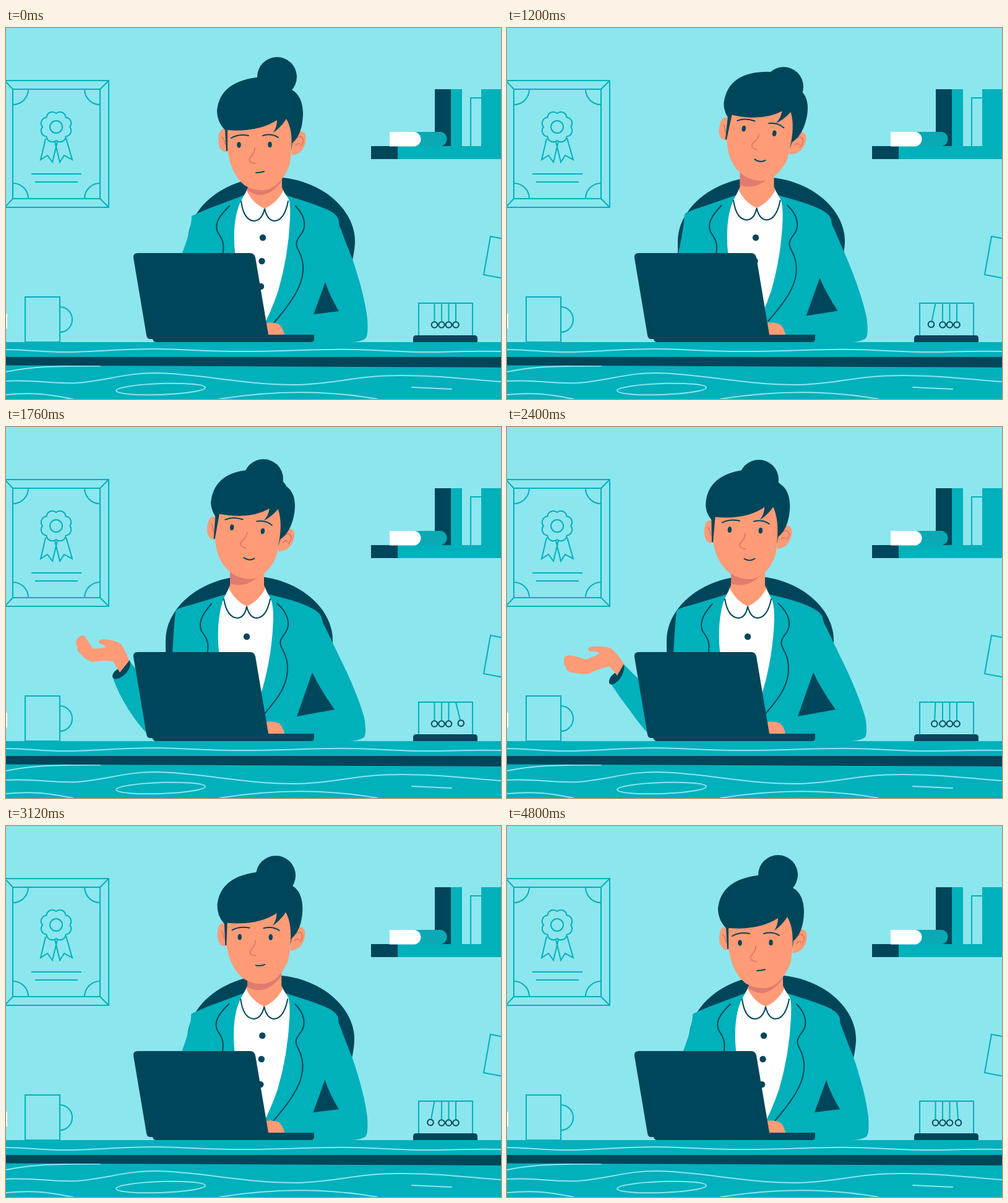
Write an HTML page that moves like this. It is 800 px wide and 600 px high and loops after 4.88 s.

```html
<!DOCTYPE html>
<html lang="en">
<head>
<meta charset="utf-8">
<title>Office call</title>
<style>
  html, body { margin: 0; width: 100%; height: 100%; overflow: hidden; background: #8ce6ee; }
  svg { display: block; width: 100vw; height: 100vh; }
  .teal { fill: #00b0bb; }
  .dark { fill: #00465a; }
  .skin { fill: #ff9b76; }
  .white { fill: #fff; }
  .line { fill: none; stroke: #00b0bb; stroke-width: 2; }
  .ink { fill: none; stroke: #00465a; stroke-width: 2; stroke-linecap: round; }
  .grain { fill: none; stroke: #8ce6ee; stroke-width: 2; stroke-linecap: round; }
  .crease { fill: none; stroke: #dc7869; stroke-width: 1.8; stroke-linecap: round; }
</style>
</head>
<body>
<svg viewBox="0 0 800 600">
  <!-- wall -->
  <g class="line">
    <path d="M-2 85H166V290H-2ZM11 99H152V276H11ZM-2 85L11 99M166 85L152 99M-2 290L11 276M166 290L152 276"/>
    <path d="M36 99A25 25 0 0 1 11 124M127 99A25 25 0 0 0 152 124M11 251A25 25 0 0 1 36 276M152 251A25 25 0 0 0 127 276"/>
    <path id="rosette"/>
    <circle cx="81" cy="160" r="10"/>
    <path d="M64 179L56 213L67 206L75 217L83 184M79 184L87 217L94 206L107 213L97 178"/>
    <path d="M41 236H122M47 249H116"/>
    <path d="M31 435H87V508H31ZM87 451A20 20.5 0 0 1 87 492"/>
    <path d="M810 342L783 337L772 399L810 406"/>
    <path d="M751 191V113H769"/>
  </g>
  <path class="white" d="M0 462H2V486H0Z"/>
  <path class="teal" d="M590 191H800V212H590ZM719 99H737V191H719ZM768 99H800V191H768Z"/>
  <path class="dark" d="M590 191H633V212H590ZM693 99H719V191H693Z"/>
  <path fill="#0aa9b4" d="M655 168H704A12 12 0 0 1 704 191H655Z"/>
  <path class="white" d="M620 168H661A12 12 0 0 1 661 191.500H620Z"/>

  <!-- cradle -->
  <path class="line" d="M667 498V445H754V498"/>
  <g id="cradle"></g>
  <path class="dark" d="M658 508V502Q658 497 663 497H757Q762 497 762 502V508Z"/>

  <!-- woman -->
  <path id="chair" class="dark" d="M294 380V345C294 291 353 241 429 241S564 291 564 345Q564 358 558 385Z"/>
  <path id="jacket" class="teal"/>
  <path id="gap" class="dark"/>
  <g id="neck">
    <path class="skin" d="M391 220V258L388 264Q398 285 418 294Q438 285 449 264L446 258V220Z"/>
    <path id="shade" fill="#e07b6f"/>
  </g>
  <path id="shirt" class="white"/>
  <path id="collar" class="ink"/>
  <path id="lapelL" class="ink"/>
  <path id="lapelR" class="ink"/>
  <g id="buttons" class="dark">
    <circle cx="415" cy="339" r="5.200"/><circle cx="413.500" cy="377" r="5.200"/><circle cx="412" cy="418" r="5.200"/>
  </g>
  <circle id="bun" class="dark" r="32"/>
  <g id="head">
    <path class="skin" d="M358 164Q346 161 344 172Q341 190 348 197Q352 202 360 199ZM460 170Q470 164 480 168Q487 172 484 185Q480 203 462 206Z"/>
    <path class="crease" d="M469 178Q477 172 480 180Q481 186 477 191M468 190Q471 185 475 188M349 176Q353 179 354 188"/>
    <path id="face" class="skin"/>
    <path id="hair" class="dark"/>
  </g>
  <g id="features">
    <path class="crease" d="M402 194Q402 202 396 208Q389 218 403 219"/>
    <path class="ink" d="M364 178Q376 171 392 174M415 174Q429 170 440 177"/>
    <path id="mouth" class="ink"/>
    <ellipse id="eyeL" class="dark" cx="376.500" cy="189" rx="3.200"/>
    <ellipse id="eyeR" class="dark" cx="426.500" cy="188.500" rx="3.200"/>
  </g>
  <g id="arm">
    <path id="sleeve" class="teal"/>
    <path id="cuff" class="dark"/>
    <path id="palm" class="skin"/>
  </g>
  <path id="typing" class="skin" d="M415 500V478Q430 474 441 479Q448 484 451 500Z"/>
  <path class="dark" d="M213 364H395Q401 364 403 371L424 496H498V503Q498 508 492 508H243Q238 508 237 503H233Q228 503 227 497L206 372Q205 364 213 364Z"/>

  <!-- desk -->
  <path class="teal" d="M0 508H800V600H0Z"/>
  <g class="grain">
    <path d="M0 520C40 520 60 525 105 524S190 519 240 519S320 524 400 523S500 519 560 520S640 525 700 524S770 522 800 523"/>
    <path d="M0 556C40 548 80 546 152 546.500"/>
    <path d="M0 571C45 568 70 576 115 574C165 570 195 557 245 558C320 560 380 577 470 577C540 575 560 562 640 562C710 562 750 569 800 572"/>
    <path d="M0 593C50 588 75 594 108 600M345 600C420 588 510 584 600 600"/>
    <ellipse cx="250" cy="584" rx="72" ry="9" transform="rotate(-2 250 584)"/>
    <path d="M656 581L720 584"/>
  </g>
  <path class="dark" d="M0 532H800V549L0 545.500Z"/>
</svg>
<script>
const LOOP = 4880, STEP = 80;
const $ = id => document.getElementById(id);
const set = (id, name, value) => $(id).setAttribute(name, value);
const lerp = (a, b, p) => a + (b - a) * p;
const ramp = (t, from, to) => {
  const u = Math.min(1, Math.max(0, (t - from) / (to - from)));
  return (1 - Math.cos(Math.PI * u)) / 2;
};
const hump = (t, from, to) => t > from && t < to ? Math.sin(Math.PI * (t - from) / (to - from)) : 0;

// Blend two paths that share the same commands.
function morph(id, [a, b], p) {
  const goal = b.match(/[\d.]+/g);
  let i = 0;
  set(id, 'd', a.replace(/[\d.]+/g, n => lerp(+n, +goal[i++], p).toFixed(2)));
}

const leaning = {
  jacket: [
    'M284 366Q300 325 300 304Q302 303 325 293L386 270L418 300L454 271Q500 285 520 294Q537 302 538 313Q538 320 541 325Q550 350 560 374Q579 430 584 470Q586 500 580 503Q572 508 555 508L270 508Z',
    'M269 366Q271 325 274 298Q276 293 298 288L354 271L389 300L425 271Q470 281 490 291Q509 300 510 309Q512 318 515 322Q526 345 538 370Q567 428 579 470Q584 500 577 503Q568 508 552 508L255 508Z'],
  gap: ['M516 411Q523 433 538 458L497 463Z', 'M495 397Q510 428 531 457L470 468Z'],
  shirt: [
    'M389 263L380 279Q367 305 369 350L380 490L412 490Q428 460 440 425Q456 370 459 310Q460 285 457 277L448 263Q438 283 418 292Q398 283 389 263Z',
    'M360 261L352 277Q341 305 343 350L354 490L386 490Q402 460 414 425Q430 370 432 310Q432 285 427 277L419 261Q409 281 389 290Q370 281 360 261Z'],
  collar: [
    'M380 280Q384 311 401 312Q414 311 418 292Q422 311 434 312Q450 311 456 280',
    'M352 278Q357 308 374 309Q386 308 389 290Q393 308 405 309Q421 308 427 278'],
  lapelL: [
    'M361 288C342 306 337 318 342 330C350 342 354 350 350 368',
    'M332 286C315 305 311 318 316 330C325 342 329 350 325 368'],
  lapelR: [
    'M468 288C483 303 486 320 478 332C468 345 467 349 473 360C484 381 483 405 466 433Q454 453 431 479',
    'M438 285C457 302 460 320 452 332C442 345 441 349 447 360C459 381 458 408 441 434Q430 450 414 468']
};
const looking = {
  shade: ['M391 240L391 263Q419 283 446 247L446 235Z', 'M391 225L391 255Q418 265 446 236L446 225Z'],
  face: [
    'M356 150L357 190Q362 235 385 254Q400 264 420 262Q445 256 458 222Q462 205 463 145Z',
    'M356 130L357 190Q362 231 388 248Q403 258 424 256Q448 250 459 218Q463 203 463 130Z'],
  hair: [
    'M356 199L354 165Q341 152 341 133Q346 85 412 79Q445 78 462 100Q480 110 480 140Q479 172 463 186L461 198Q464 165 453 147Q444 161 432 169Q438 160 438 149Q407 169 358 165L358 199Z',
    'M356 199L354 163Q342 149 344 133Q348 87 412 79Q445 78 462 100Q480 110 480 140Q479 172 463 186L461 198Q464 160 453 138Q444 152 432 160Q439 151 439 139Q410 161 360 158L358 199Z'],
  mouth: ['M404 234Q411 234 417 232', 'M402 235Q411 240 419 234']
};
const lowering = {
  sleeve: [
    'M199 378L172 404Q181 430 198 457Q217 487 240 508L330 508L250 440Z',
    'M189 384L165 411Q181 436 199 459Q218 487 240 508L330 508L245 440Z'],
  cuff: [
    'M200 377Q204 390 190 402Q176 412 172 404Q172 395 182 391Z',
    'M189 383Q191 397 181 409Q169 421 165 414Q164 405 174 398Z'],
  palm: [
    'M184 397L173 379Q158 376 140 380Q128 377 121 367Q113 362 116 356Q110 350 115 343Q120 336 126 337Q132 345 140 358Q152 359 162 356Q158 352 151 350Q147 344 158 343Q178 345 186 351Q195 365 199 378Z',
    'M178 402L166 387Q150 390 132 399Q118 400 105 397Q94 395 96 389Q91 383 92 379Q91 370 100 369Q115 371 127 376Q137 373 150 366Q145 362 134 363Q127 358 137 355Q158 354 168 358Q180 368 189 383Z']
};
function morphAll(shapes, p) {
  for (const id in shapes) morph(id, shapes[id], p);
}

// time, head x, y, tilt, upward look, bun x, bun y
const headKeys = [
  [660, 0, 0, 0, 0, 438, 79],
  [1200, -1.5, -9.5, 9.4, 1, 447, 95],
  [1760, -19, -11, 7.5, 1, 416, 84],
  [2320, -24.5, -10.5, 2.2, 1, 407, 85],
  [2780, -24.5, -10.5, 2.2, 1, 407, 85],
  [3120, -1.5, -5, 1, .35, 436, 80],
  [3340, 0, 0, 0, 0, 438, 79]
];
function headPose(t) {
  const next = headKeys.findIndex(k => k[0] > t);
  if (next < 1) return headKeys[0].slice(1);
  const a = headKeys[next - 1], b = headKeys[next];
  const p = ramp(t, a[0], b[0]);
  return a.slice(1).map((v, i) => lerp(v, b[i + 1], p));
}

function buildRosette() {
  let d = '';
  for (let i = 0; i <= 8; i++) {
    const a = i * Math.PI / 4;
    const point = `${81 + 22 * Math.cos(a)} ${160 + 22 * Math.sin(a)}`;
    d += i ? `A9.5 9.5 0 0 1 ${point}` : 'M' + point;
  }
  set('rosette', 'd', d);
}

function buildCradle() {
  $('cradle').innerHTML = [692.5, 704, 715.5, 727].map(x =>
    `<g><path class="line" d="M${x} 445V474"/><circle class="ink" cx="${x}" cy="480" r="4.800"/></g>`).join('');
}

function swing(ball, x, angle) {
  $('cradle').children[ball].setAttribute('transform', `rotate(${angle} ${x} 445)`);
}

function draw(t) {
  const lean = ramp(t, 700, 1700) - ramp(t, 2780, 3160);
  const [x, y, tilt, look, bunX, bunY] = headPose(t);
  const place = (dx, dy) => `translate(${dx} ${dy}) rotate(${tilt} 411.5 184.5)`;

  set('chair', 'transform', `translate(${-36 * lean} 0)`);
  set('neck', 'transform', `translate(${-29 * lean} ${-2 * lean})`);
  set('buttons', 'transform', `translate(${-26 * lean} 0)`);
  morphAll(leaning, lean);
  morphAll(looking, look);
  set('head', 'transform', place(x, y));
  set('features', 'transform', place(x + 8 * look, y - 11 * look));
  set('bun', 'cx', bunX);
  set('bun', 'cy', bunY);

  const blink = hump(t, 200, 440) + hump(t, 3560, 3800);
  for (const id of ['eyeL', 'eyeR']) set(id, 'ry', 4.8 - 4 * blink);

  const hidden = 1 - ramp(t, 1400, 1760) + ramp(t, 2820, 3080);
  set('arm', 'transform', `translate(${150 * hidden} ${70 * hidden})`);
  morphAll(lowering, ramp(t, 1770, 2260));

  const tap = Math.max(0, Math.sin(t / LOOP * 24 * Math.PI)) * (1 - lean);
  set('typing', 'transform', `translate(${2 * tap} ${-2 * tap})`);

  const phase = t % (LOOP / 5);
  swing(0, 692.5, 12 * hump(phase, 40, 480));
  swing(3, 727, -15 * hump(phase, 530, 930));
}

buildRosette();
buildCradle();
const start = performance.now();
function tick() {
  const t = (performance.now() - start) % LOOP;
  draw(Math.floor(t / STEP) * STEP);
  requestAnimationFrame(tick);
}
tick();
</script>
</body>
</html>
```
